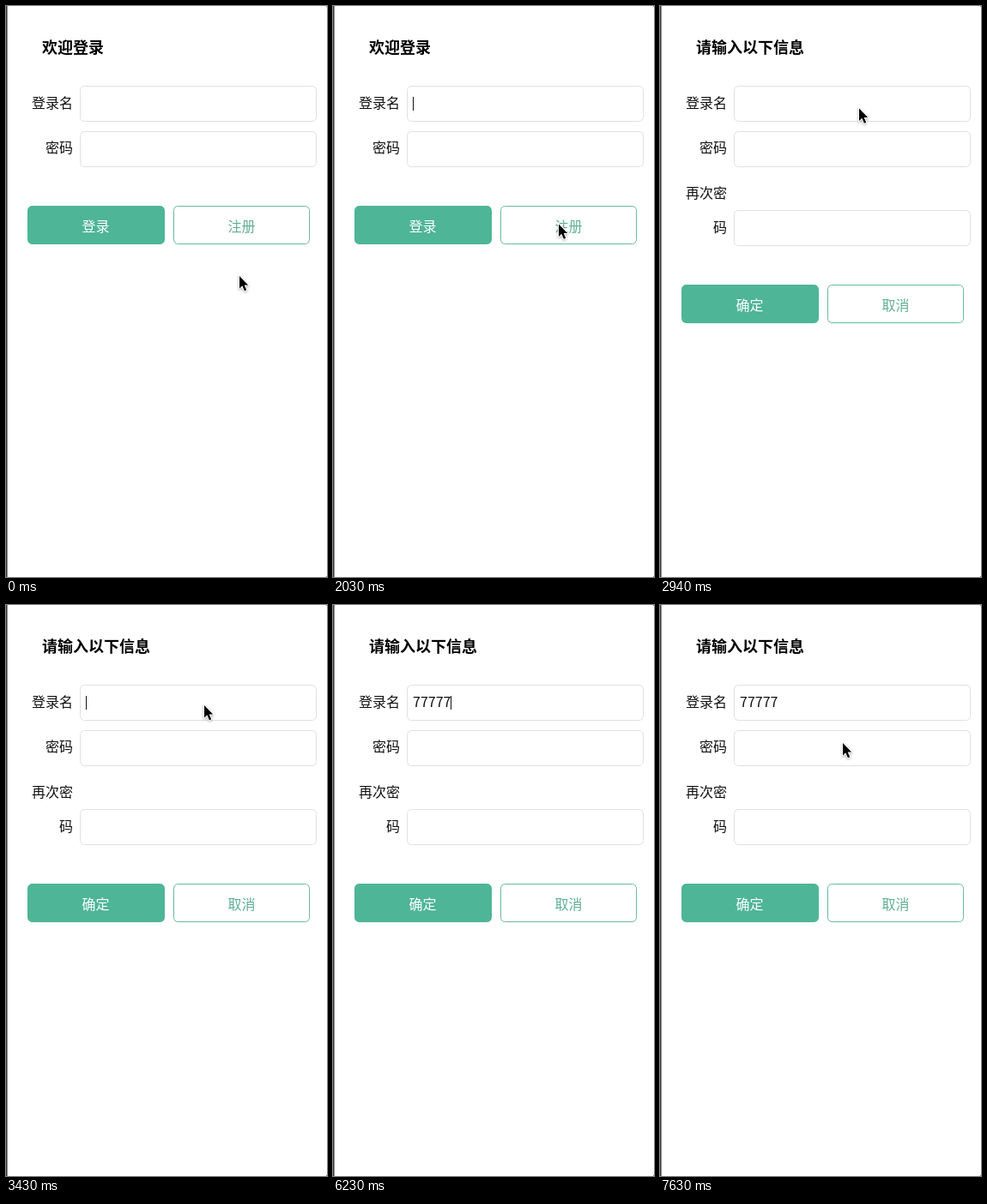
An HTML page with a canvas that plays this animation: 374x666 px, repeating every 8000 ms.

```html
<!DOCTYPE html>
<html lang="zh-CN">
<head>
<meta charset="utf-8">
<title>登录与注册</title>
<style>
  html, body { margin: 0; width: 100%; height: 100%; overflow: hidden; background: #fff; }
  canvas { display: block; width: 374px; height: 666px; }
</style>
</head>
<body>
<canvas id="stage"></canvas>
<script>
const W = 374, H = 666, LOOP = 8000, STEP = 70;
const FONT = '"Noto Sans CJK SC", "Noto Sans CJK", sans-serif';
const GREEN = '#4eb597', LINK = '#5fae95', BORDER = '#dfe0e2';

const canvas = document.getElementById('stage');
const ctx = canvas.getContext('2d');
const ratio = window.devicePixelRatio || 1;
canvas.width = W * ratio;
canvas.height = H * ratio;

// Cursor path: time, x, y of the tip; null position means hidden.
const path = [
  [0, 272, 315], [350, 272, 315], [560, 269, 290], [770, 263.5, 257], [910, 263, 254.5],
  [2310, 263, 254.5], [2520, 257, 225], [2730, 241, 154], [2940, 232, 119.5],
  [3080, 231, 117], [4830, null], [6440, 227, 127], [6510, 218, 148],
  [6580, 213, 162], [6720, 213, 161], [LOOP, 213, 161]
];
const clicks = [910, 1750, 3080, 6790];
const CLICK_TIME = 140;

// Times when the caret is lit in each field.
const loginCaret = [[980, 1540], [2030, 2100], [3430, 3920], [4480, 5880], [5950, 6720]];
const passwordCaret = [[7070, 7630]];
const keyTimes = [4900, 5110, 5390, 5950, 6230];

const within = (spans, t) => spans.some(([a, b]) => t >= a && t < b);

function cursorAt(t) {
  const i = path.findIndex((p, n) => t >= p[0] && t < path[n + 1][0]);
  const [t0, x0, y0] = path[i], [t1, x1, y1] = path[i + 1];
  if (x0 === null) return null;
  if (x1 === null) return [x0, y0];
  const k = (t - t0) / (t1 - t0);
  return [x0 + (x1 - x0) * k, y0 + (y1 - y0) * k];
}

function text(str, x, y, { size = 16, weight = 400, color = '#111', align = 'left' } = {}) {
  ctx.font = `${weight} ${size}px ${FONT}`;
  ctx.fillStyle = color;
  ctx.textAlign = align;
  ctx.fillText(str, x, y);
}

function box(x, y, w, h, r, stroke, fill) {
  ctx.beginPath();
  ctx.roundRect(x, y, w, h, r);
  if (fill) {
    ctx.fillStyle = fill;
    ctx.fill();
  }
  ctx.lineWidth = 1;
  ctx.strokeStyle = stroke;
  ctx.stroke();
}

const label = (str, y) => text(str, 78, y, { align: 'right' });
const field = y => box(86.5, y + 0.5, 275, 41, 5, BORDER);

function buttons(y, main, other) {
  const style = { weight: 500, align: 'center' };
  box(25.5, y + 0.5, 159, 44, 5, GREEN, GREEN);
  box(195.5, y + 0.5, 158, 44, 5, '#68b9a0');
  text(main, 104.5, y + 29.5, { ...style, color: '#fff' });
  text(other, 274.5, y + 29.5, { ...style, color: LINK });
}

function form(title) {
  text(title, 42, 55, { size: 18, weight: 700, color: '#000' });
  label('登录名', 119);
  field(93);
  label('密码', 171);
  field(146);
}

function loginPage() {
  form('欢迎登录');
  buttons(233, '登录', '注册');
}

function registerPage() {
  form('请输入以下信息');
  label('再次密', 224);
  label('码', 264);
  field(238);
  buttons(325, '确定', '取消');
}

function caret(x, y) {
  ctx.fillStyle = '#111';
  ctx.fillRect(Math.round(x), y, 1, 16);
}

function typing(t) {
  const typed = '7'.repeat(keyTimes.filter(k => t >= k).length);
  text(typed, 93, 119);
  if (within(loginCaret, t)) caret(93 + ctx.measureText(typed).width, 106);
  if (within(passwordCaret, t)) caret(93, 159);
}

function ring(x, y) {
  ctx.beginPath();
  ctx.arc(x, y + 0.5, 24.5, 0, Math.PI * 2);
  ctx.lineWidth = 2.5;
  ctx.strokeStyle = '#333';
  ctx.stroke();
}

function arrow(x, y) {
  const shape = new Path2D('M0 0V14.4L3.3 11.3L5.9 17.2L8.2 16.2L5.7 10.5H10.2Z');
  ctx.save();
  ctx.translate(x, y);
  ctx.lineJoin = 'round';
  ctx.lineWidth = 2;
  ctx.strokeStyle = '#fff';
  ctx.shadowColor = 'rgba(0,0,0,.35)';
  ctx.shadowBlur = 3 * ratio;
  ctx.shadowOffsetY = ratio;
  ctx.stroke(shape);
  ctx.shadowColor = 'transparent';
  ctx.fillStyle = '#000';
  ctx.fill(shape);
  ctx.restore();
}

function windowEdge() {
  ctx.fillStyle = '#3d3d3f';
  ctx.fillRect(0, 0, 1.6, H);
  ctx.fillStyle = '#8a8a8a';
  ctx.fillRect(W - 1, 0, 1, 1);
  ctx.fillRect(W - 1, H - 1, 1, 1);
}

function draw(t) {
  ctx.setTransform(ratio, 0, 0, ratio, 0, 0);
  ctx.fillStyle = '#fff';
  ctx.fillRect(0, 0, W, H);
  windowEdge();
  (t < 2100 ? loginPage : registerPage)();
  typing(t);
  const tip = cursorAt(t);
  if (!tip) return;
  if (clicks.some(c => t >= c && t < c + CLICK_TIME)) ring(...tip);
  arrow(...tip);
}

const start = performance.now();
function tick() {
  const t = (performance.now() - start) % LOOP;
  draw(Math.floor(t / STEP + 1e-6) * STEP);
  requestAnimationFrame(tick);
}
tick();
</script>
</body>
</html>
```
